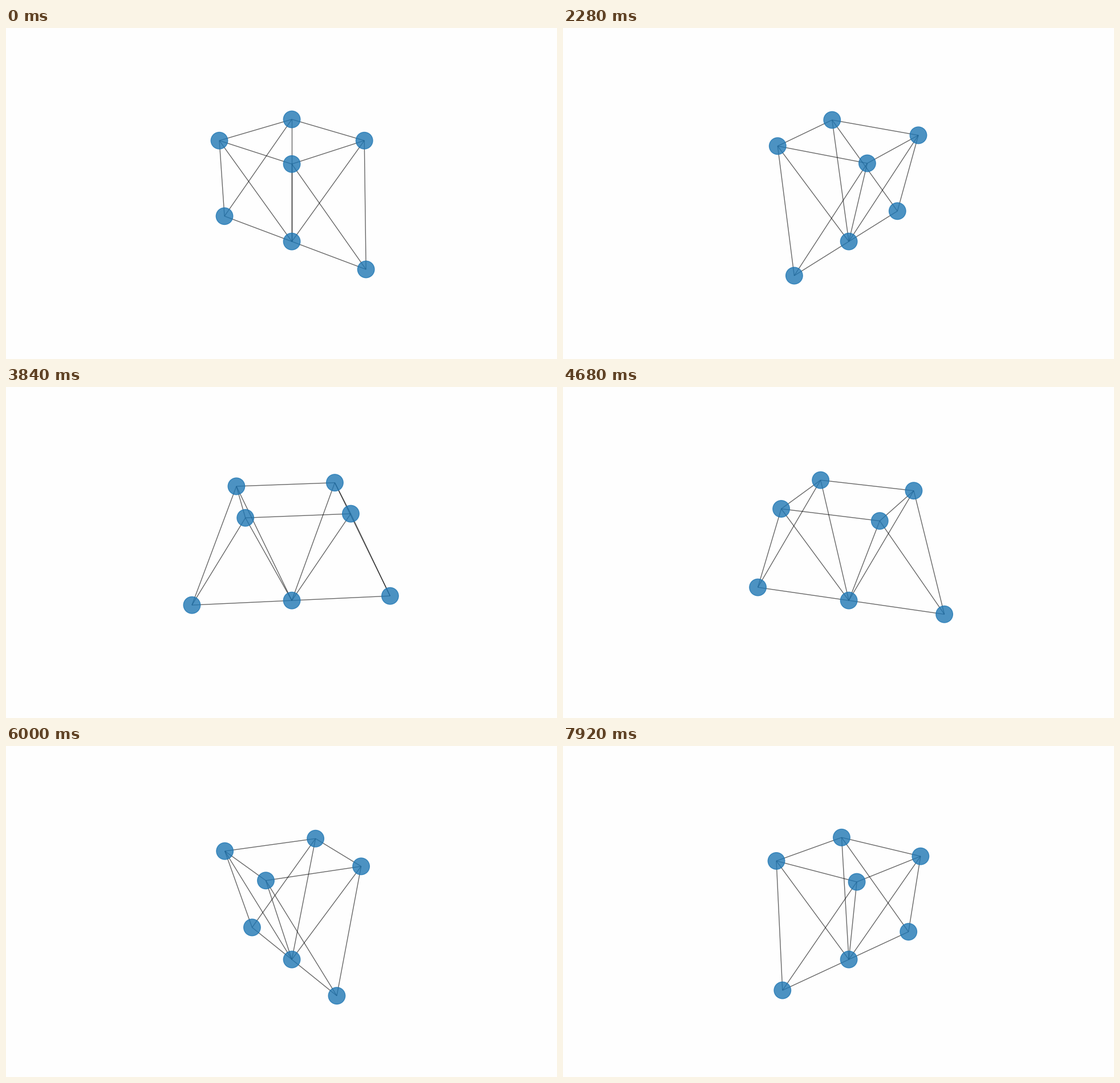
Write a matplotlib script that moves like this. It is 966 by 580 pixels and loops after 8000 ms.

```python
import numpy as np
import matplotlib.pyplot as plt
from matplotlib.animation import FuncAnimation
from matplotlib.collections import LineCollection
from matplotlib.patches import Circle

W, H, DPI = 966, 580, 100
TICK, FRAMES = 40, 200       # 8 s loop
HOLD = 3                     # ticks per pose
TURN = np.radians(4)         # turn per pose
BALL = np.sqrt(450) / 2 * DPI / 72

# Perspective camera: lengths are in units of the viewing distance
ELEV = np.radians(20)
SIDE = 0.77 * H
FOCAL = SIDE / 0.185
CX = 0.5125 * W - SIDE / 2 + 0.095 * FOCAL
CY = 0.11 * H + 0.095 * FOCAL
HALF_Z = 0.038961
HALF_X = HALF_Z * 4 / 3


def build():
    """Upper square (0-3), two lower ends (4, 5) and the hub between them (6)."""
    corners = np.arange(4) * np.pi / 2
    ends = np.pi / 4 + np.arange(2) * np.pi
    angle = np.concatenate([corners, ends, [0]])
    radius = HALF_X * np.repeat([1, np.sqrt(2), 0], [4, 2, 1])
    height = HALF_Z * np.repeat([1, -1], [4, 3])
    hub = 6
    edges = [(end, hub) for end in (4, 5)]
    for i in range(4):
        edges += [(i, (i + 1) % 4), (i, hub), (i, 4 + i // 2)]
    return angle, radius, height, np.array(edges)


angle, radius, height, edges = build()


def project(turn):
    """Stage positions of all nodes after a turn about the vertical axis."""
    phi = angle - turn
    right = radius * np.sin(phi)
    front = radius * np.cos(phi)
    up = height * np.cos(ELEV) - front * np.sin(ELEV)
    near = height * np.sin(ELEV) + front * np.cos(ELEV)
    scale = FOCAL / (1 - near)
    return np.column_stack([CX + right * scale, CY + up * scale])


fig = plt.figure(figsize=(W / DPI, H / DPI), dpi=DPI, facecolor="#fefefe")
ax = fig.add_axes([0, 0, 1, 1])
ax.set_xlim(0, W)
ax.set_ylim(0, H)
ax.axis("off")

start = project(0)
lines = LineCollection(start[edges], colors="black", linewidths=1,
                       alpha=0.6, zorder=1)
ax.add_collection(lines, autolim=False)
# Separate patches keep sub-pixel positions
balls = [ax.add_patch(Circle(p, BALL, color="#1f77b4", linewidth=1,
                             alpha=0.8, zorder=2)) for p in start]


def update(frame):
    pos = project(TURN * (frame // HOLD))
    lines.set_segments(pos[edges])
    for ball, p in zip(balls, pos):
        ball.set_center(p)
    return [lines, *balls]


anim = FuncAnimation(fig, update, frames=FRAMES, interval=TICK,
                     repeat=True, repeat_delay=0, blit=False)
plt.show()
```
